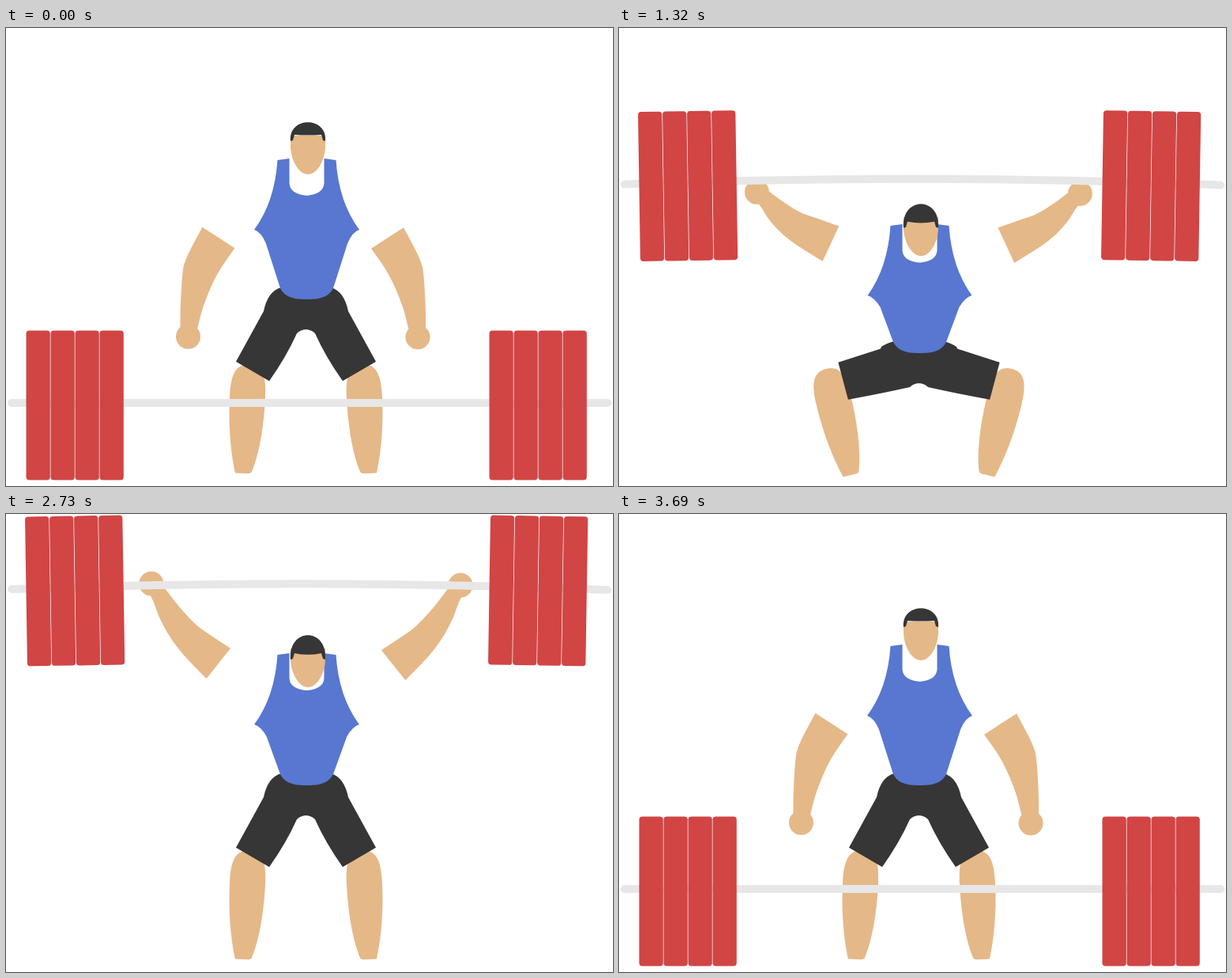
Write an HTML page with a canvas that moves like this. It is 768 by 579 pixels and loops after 4680 ms.

```html
<!DOCTYPE html>
<html lang="en">
<head>
<meta charset="utf-8">
<title>Weightlifter</title>
<style>
html, body { margin: 0; width: 100%; height: 100%; overflow: hidden; background: #fff; }
canvas { display: block; }
</style>
</head>
<body>
<canvas id="stage" width="768" height="579"></canvas>
<script>
const ctx = document.getElementById('stage').getContext('2d');
const SKIN = '#e5b888', BLUE = '#5877d0', DARK = '#363636', RED = '#d14545', STEEL = '#e7e7e7';
const LOOP = 4680, STEP = 30, RAD = Math.PI / 180;
const LIFT = 600, DROP = 3120, FALL = 198, FLOOR = 474, TOP = 95;

// Key poses: time, hip y, strap y, upper arm angle, arm reach, bar below hand
const stand = [381, 166, 33, 131, 8], overhead = [381, 177, 128.5, 132, 7];
const poses = [
  [0, ...stand],
  [LIFT, 452, 301, 57, 130, 6],
  [1020, 420, 264, 57, 129, 8],
  [1140, 384, 182, 66, 104, 2],
  [1320, 449, 249, 115, 114, -10],
  [1650, 467, 265, 127, 130, -2],
  [1860, 464, 261, 128.5, 132, 1],
  [2340, 397, 192, 128.5, 132, 4],
  [2640, ...overhead],
  [DROP, ...overhead],
  [3560, ...stand],
];

// Monotone cubic through one column of the poses, level at turning points.
function poseValue(t, col) {
  const last = poses.length - 1;
  if (t >= poses[last][0]) return poses[last][col];
  const i = poses.findIndex(p => p[0] > t) - 1;
  const rise = j => (poses[j + 1][col] - poses[j][col]) / (poses[j + 1][0] - poses[j][0]);
  const slope = j => {
    if (j < 1 || j >= last) return 0;
    const a = rise(j - 1), b = rise(j);
    return a * b <= 0 ? 0 : 2 * a * b / (a + b);
  };
  const w = poses[i + 1][0] - poses[i][0], p = (t - poses[i][0]) / w, q = 1 - p;
  return poses[i][col] * (1 + 2 * p) * q * q + poses[i + 1][col] * (3 - 2 * p) * p * p
    + w * p * q * (slope(i) * q - slope(i + 1) * p);
}

// On the floor, in the hands, then free fall and a fading bounce
function barHeight(t, held) {
  if (t < LIFT) return FLOOR;
  if (t < DROP) return Math.min(FLOOR, held);
  const fall = (t - DROP) / FALL;
  if (fall < 1) return TOP + (FLOOR - TOP) * fall * fall;
  const rest = Math.min(1, (t - DROP - FALL) / 370);
  return FLOOR - 24 * (1 - rest) ** 2 * Math.abs(Math.sin(2 * Math.PI * rest));
}

function fillPath(color, d) {
  ctx.fillStyle = color;
  ctx.fill(new Path2D(d));
}

// Closed curve through the midpoints; a doubled point stays sharp.
function smooth(points) {
  const mid = (a, b) => [(a[0] + b[0]) / 2, (a[1] + b[1]) / 2];
  ctx.beginPath();
  points.forEach((p, i) => ctx.quadraticCurveTo(...p, ...mid(p, points[(i + 1) % points.length])));
  ctx.fill();
}

// Draws the left half, then its reflection; sum is left x + right x.
function bothSides(sum, draw, dy = 0) {
  draw();
  ctx.save();
  ctx.transform(-1, 0, 0, 1, sum, dy);
  draw();
  ctx.restore();
}

function leg(hip) {
  const bend = Math.max(0, (hip - 381) / 83);
  ctx.save();
  ctx.translate(292 + 9 * (1 - bend) ** 8 + 3 * bend, 563 + 3 * Math.sin(3 * bend));
  ctx.rotate((3 - 20 * bend) * RAD);
  fillPath(SKIN, `M-11 0C-17 -22 -23 -55 -23 -98C-23 -125 -17 -138 0 -138
    S22 -125 22 -95C22 -60 18 -25 10 -3Q9 0 5 0Z`);
  ctx.restore();

  // The cuff turns from slanted to upright as the knee bends.
  const cuff = (30 + 55 * bend) * RAD, dx = 24.3 * Math.cos(cuff), dy = 24.3 * Math.sin(cuff);
  const x = 312 - 32 * bend ** .6, y = 434 + 15 * bend;
  fillPath(DARK, `M381 ${hip - 53}H348Q331 ${hip - 48} ${326 + 6 * bend} ${hip - 23 - 25 * bend}
    L${x - dx} ${y - dy}L${x + dx} ${y + dy}
    Q${(x + dx + 368) / 2 + 4} ${(y + dy + hip + 5) / 2} 368 ${hip + 5}Q373 ${hip} 381 ${hip}Z`);
}

function torsoHalf(hip, strap, squash) {
  const bottom = hip - 38, neck = strap + 46 + squash * .35;
  const pitX = 314 + squash * .12, pitY = strap + 89, side = (bottom - 14 - pitY) / 72;
  fillPath(BLUE, `M343.5 ${strap + 1}L358.5 ${strap - 1}V${neck - 16}Q359 ${neck - 2} 381 ${neck}
    V${bottom}Q354 ${bottom + 1} 347 ${bottom - 14}L${pitX + 20 - 5 * side} ${pitY + 5 + 12 * side}
    Q${pitX + 9} ${pitY + 3} ${pitX} ${pitY}Q340 ${strap + 54} 343.5 ${strap + 1}Z`);
}

function head(y, tilt) {
  const burn = y + tilt + 6, dome = y - (tilt + 6) / 3, line = y + tilt;
  fillPath(SKIN, `M360 ${y + 17}V${y + 32}C361 ${y + 50} 371 ${y + 66} 382 ${y + 66}
    S403 ${y + 50} 404 ${y + 32}V${y + 17}Z`);
  fillPath(DARK, `M360 ${burn + 1}C357 ${dome} 407 ${dome} 404 ${burn + 1}
    L401 ${burn}L399 ${line - 1}Q382 ${line + (tilt - 17) * .4} 365 ${line - 1}L363 ${burn}Z`);
}

// Local axes of a limb: along it and out to its outer side
const limb = (x, y, a) => (along, out) => [
  x - Math.sin(a) * along - Math.cos(a) * out,
  y + Math.cos(a) * along - Math.sin(a) * out];

function arm(upper, [hx, hy], angle) {
  const [ex, ey] = upper(40, 0), outer = upper(0, 24.5), inner = upper(0, -24.5);
  let a = Math.atan2(ex - hx, hy - ey);
  if (a < -Math.PI / 2) a += 2 * Math.PI;
  const fore = limb(ex, ey, a), len = Math.hypot(hx - ex, hy - ey);
  const shift = (angle - a / RAD) * .15;
  ctx.fillStyle = SKIN;
  smooth([outer, outer, inner, inner, fore(len * .09, -21), fore(len * .55, -15 + shift),
    fore(len * .8, -10), fore(len, -9), fore(len, 10), fore(len * .8, 12 + shift / 2),
    fore(len * .55, 14 + shift), fore(len * .2, 18 + shift), fore(0, 22)]);
  ctx.beginPath();
  ctx.arc(hx, hy, 15.5, 0, 7);
  ctx.fill();
}

function barbell(y) {
  const bow = 7 * (1 - Math.exp((y - FLOOR) / 60));
  ctx.strokeStyle = STEEL;
  ctx.lineWidth = 10;
  ctx.lineCap = 'round';
  ctx.stroke(new Path2D(`M7 ${y}Q384 ${y - 2 * bow} 761 ${y + bow / 7}`));
  ctx.fillStyle = RED;
  for (const [x, turn] of [[87.5, -1], [673.5, 1]]) {
    ctx.save();
    ctx.translate(x, y + 3 - bow / 7);
    ctx.rotate(turn * bow * .13 * RAD);
    for (let i = 0; i < 4; i++) {
      ctx.beginPath();
      ctx.roundRect(-62 + 31 * i, -94.5, 30.3, 189, 4);
      ctx.fill();
    }
    ctx.restore();
  }
}

function draw(t) {
  const [hip, strap, angle, reach, grip] = [1, 2, 3, 4, 5].map(col => poseValue(t, col));
  const squash = Math.max(0, 205 - hip + strap);
  const sx = 269 - squash * .2, sy = strap + 129 - angle * .91 - squash * .12;
  const elbowBend = 14 * Math.tanh((angle - 90) / 20) - 2;
  const hand = limb(sx, sy, (angle + elbowBend) * RAD)(reach, 0);

  const arms = () => bothSides(749 + angle / 13,
    () => arm(limb(sx, sy, angle * RAD), hand, angle), angle / 60);
  const bar = () => barbell(barHeight(t, hand[1] + grip));

  ctx.fillStyle = '#fff';
  ctx.fillRect(0, 0, 768, 579);
  bothSides(759, () => leg(hip));
  bothSides(761, () => torsoHalf(hip, strap, squash));
  head(strap - 47 + (angle - 33) * .24 + squash * .1, 17 + (angle - 33) * .07 + squash * .17);
  // Lowered fists cover the bar; raised ones are behind it.
  for (const part of angle < 90 ? [bar, arms] : [arms, bar]) part();
}

function tick() {
  draw(Math.floor(performance.now() % LOOP / STEP) * STEP);
  requestAnimationFrame(tick);
}
tick();
</script>
</body>
</html>
```
